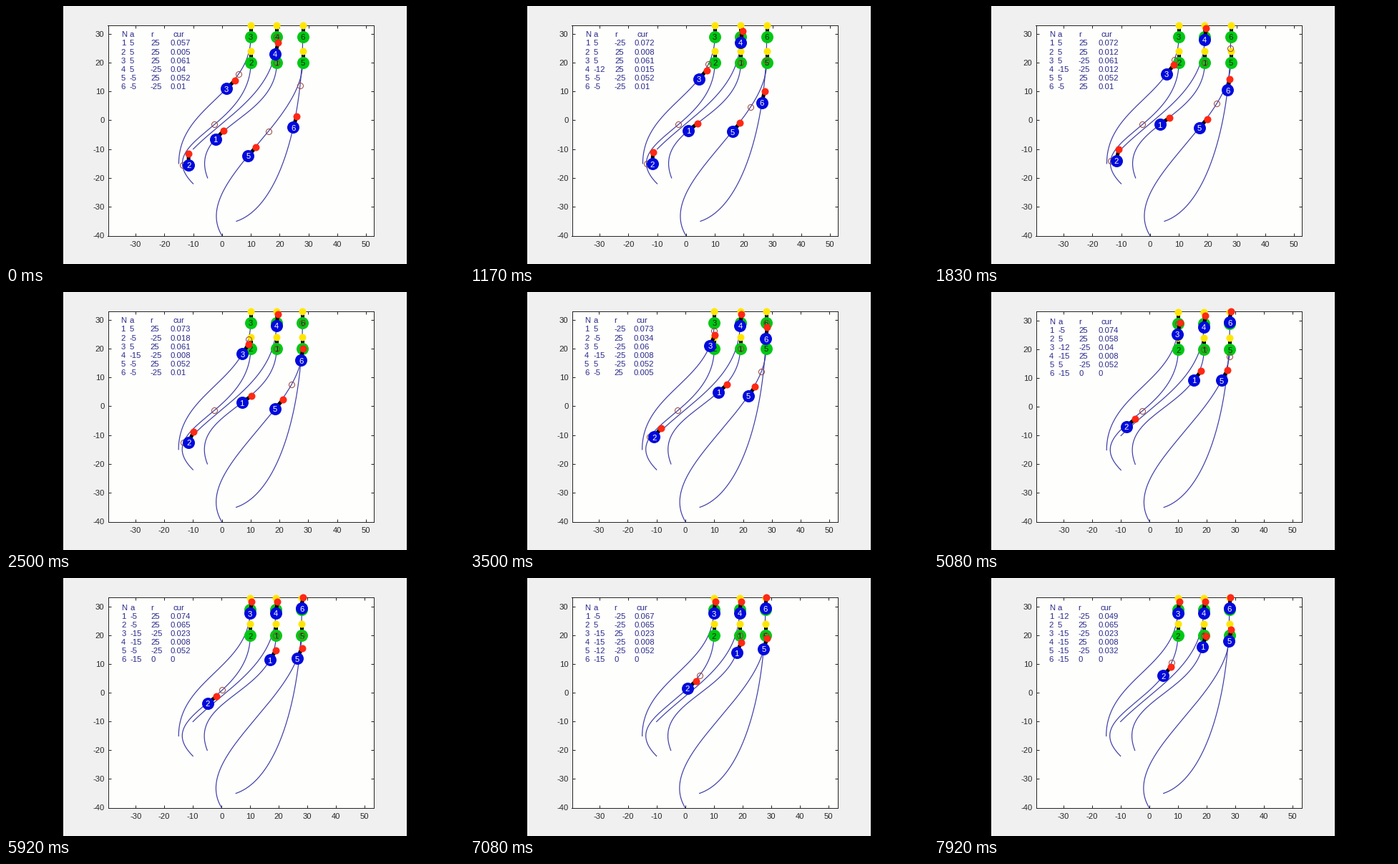
These frames come from a looping animation (640x360 px, 8000 ms). A matplotlib script:

```python
import numpy as np
import matplotlib.pyplot as plt
from matplotlib.animation import FuncAnimation
from matplotlib.patches import Rectangle
from matplotlib.ticker import MultipleLocator

W, H, DPI = 640, 360, 80
FRAMES, LOOP_MS = 96, 8000
PX = 72 / DPI  # one pixel in points
ARM = 4        # distance from body to head

OUTER, INNER = "#f0f0f0", "#fefefc"
INK, TABLE_INK = "#262626", "#28288c"
CURVE, GREEN, YELLOW = "#3c3ca8", "#00c814", "#ffe600"
BLUE, RED, RING = "#000adc", "#ff2814", "#96463c"

plt.rcParams.update({"font.family": "Liberation Sans", "font.size": 11.3 * PX,
                     "axes.unicode_minus": False})

# Per vehicle: Bezier control points of its path, (step, y) stops of its climb,
# first height and lead of its look-ahead ring, sideways drift at the start,
# and (step, curvature in thousandths) stops
PLANS = [
    dict(path=[(-5, -20), (-12, -2), (19, 0), (19, 20)],
         climb=[(0, -6.5), (14, -3.6), (52, 7.9), (95, 16.1)],
         ring=(20, 0), drift=0,
         curv=[(0, 57), (14, 72), (71, 74), (85, 66), (95, 49)]),
    dict(path=[(-10, -22), (-25, -7), (10, -3), (10, 20)],
         climb=[(0, -15.5), (14, -15.1), (52, -9.1), (71, -3.6), (95, 6)],
         ring=(-1.5, 4.6), drift=2.1,
         curv=[(0, 5), (14, 8), (30, 18), (65, 65)]),
    dict(path=[(-15, -15), (-15, 5), (10, 9), (10, 29)],
         climb=[(0, 11), (70, 27.8)], ring=(15, 5), drift=0,
         curv=[(40, 61), (52, 54), (70, 23)]),
    dict(path=[(-10, -10), (2, 2), (19, 10), (19, 29)],
         climb=[(0, 23), (17, 27.9)], ring=(29, 0), drift=0,
         curv=[(0, 40), (14, 15), (30, 8)]),
    dict(path=[(0, -40), (-11, -22), (28, -1.5), (28, 20)],
         climb=[(0, -12.3), (14, -3.9), (30, -0.8), (52, 7.3), (95, 18.1)],
         ring=(-5, 8.4), drift=0, curv=[(85, 52), (95, 32)]),
    dict(path=[(5, -35), (20, -30), (28, 0), (28, 29)],
         climb=[(0, -2.5), (52, 29.5)], ring=(12, 14.5), drift=0,
         curv=[(30, 10), (52, 0)]),
]
# Random steering directions, two per vehicle and step
SIGNS = np.random.default_rng(4).choice([-1, 1], (FRAMES, len(PLANS), 2))


def bezier(points, n=200):
    a, b, c, d = np.array(points, float)
    t = np.linspace(0, 1, n)[:, None]
    u = 1 - t
    return (u**3 * a + 3 * u**2 * t * b + 3 * u * t**2 * c + t**3 * d).T


def track(k, stops):
    return np.interp(k, *zip(*stops))


def dot(color, size, z):
    return ax.plot([], [], "o", color=color, ms=size * PX, mew=0,
                   zorder=z, clip_on=False)[0]


def circle():
    return ax.plot([], [], "o", mfc="none", mec=RING, mew=PX, ms=8 * PX,
                   zorder=5, clip_on=False)[0]


class Disc:
    """Numbered disc with a small head on a short thick arm."""

    def __init__(self, num, body, head, ink, z):
        self.arm = ax.plot([], [], color="black", lw=5 * PX, zorder=z,
                           solid_capstyle="butt", clip_on=False)[0]
        self.head = dot(head, 10, z + 0.1)
        self.body = dot(body, 17, z + 0.2)
        self.num = ax.text(0, 0, num, color=ink, zorder=z + 0.3, ha="center",
                           va="center_baseline")

    def place(self, x, y, angle):
        hx, hy = x + ARM * np.cos(angle), y + ARM * np.sin(angle)
        self.arm.set_data([x, hx], [y, hy])
        self.head.set_data([hx], [hy])
        self.body.set_data([x], [y])
        self.num.set_position((x, y - 0.1))
        return hx, hy


def cell(x, row, s=""):
    return ax.text(x, 28.8 - 3 * row, s, color=TABLE_INK, va="baseline")


class Robot:
    """Vehicle that climbs its path, with its rings and its table row."""

    def __init__(self, i, plan):
        self.i, self.plan = i, plan
        self.xs, self.ys = bezier(plan["path"])
        self.angles = np.arctan2(np.gradient(self.ys), np.gradient(self.xs))
        self.goal = plan["path"][-1]
        ax.plot(self.xs, self.ys, color=CURVE, lw=1.2 * PX, zorder=3)
        z = i * 0.5
        Disc(i + 1, GREEN, YELLOW, "#102010", 4 + z / 10).place(*self.goal, np.pi / 2)
        self.disc = Disc(i + 1, BLUE, RED, "white", 6 + z)
        self.rings = circle(), circle()
        cell(-35, i + 1, str(i + 1))
        self.cells = [cell(x, i + 1) for x in (-32, -24.8, -17.9)]

    def x_at(self, y):
        return np.interp(y, self.ys, self.xs)

    def move(self, k):
        plan, goal_y = self.plan, self.goal[1]
        y = track(k, plan["climb"])
        first, lead = plan["ring"]
        for ring, ry in zip(self.rings, (y, max(y + lead, first))):
            ry = min(ry, goal_y)
            ring.set_data([self.x_at(ry)], [ry])

        # the heading lags a little behind the path's tangent
        angle = 0.94 * np.interp(y, self.ys, self.angles)
        drift = plan["drift"] * max(0, 1 - (k / 75) ** 2)

        gap = goal_y - y
        cur = round(track(k, plan["curv"])) / 1000
        turn, side = SIGNS[k, self.i]
        steer = -15 if gap < 1.93 else -12 if gap < 5.6 else 5 * turn
        radius = 25 * side if cur else 0
        for item, value in zip(self.cells, (steer, radius, cur)):
            item.set_text(f"{value:g}")
        return self.disc.place(self.x_at(y) + drift, y, angle)


fig = plt.figure(figsize=(W / DPI, H / DPI), dpi=DPI, facecolor="black")
fig.add_artist(Rectangle((80 / W, 0), 480 / W, 1, color=OUTER, lw=0, zorder=-1))
BOX_W, BOX_H = 371, 294
ax = fig.add_axes([142.5 / W, 39.5 / H, BOX_W / W, BOX_H / H], facecolor=INNER)
ax.tick_params(direction="in", top=True, right=True, length=4 * PX,
               width=PX, color=INK, labelcolor=INK)
ax.tick_params(axis="x", pad=8 * PX)
ax.tick_params(axis="y", pad=5 * PX)
for axis in (ax.xaxis, ax.yaxis):
    axis.set_major_locator(MultipleLocator(10))
for side in ax.spines.values():
    side.set(color=INK, linewidth=PX)

for x, name in zip((-35, -32, -24.8, -17), ("N", "a", "r", "cur")):
    cell(x, 0, name)
robots = [Robot(i, plan) for i, plan in enumerate(PLANS)]


def update(k):
    heads = np.array([robot.move(k) for robot in robots])
    # equal-scale view that grows with the furthest head
    right, top = np.maximum(heads.max(axis=0), (28, 33))
    mid, half = (right - 15) / 2, (top + 40) * BOX_W / BOX_H / 2
    ax.set_xlim(mid - half, mid + half)
    ax.set_ylim(-40, top)
    return []


anim = FuncAnimation(fig, update, frames=FRAMES, interval=LOOP_MS / FRAMES,
                     init_func=lambda: update(0), repeat=True, repeat_delay=0,
                     blit=False)
plt.show()
```
